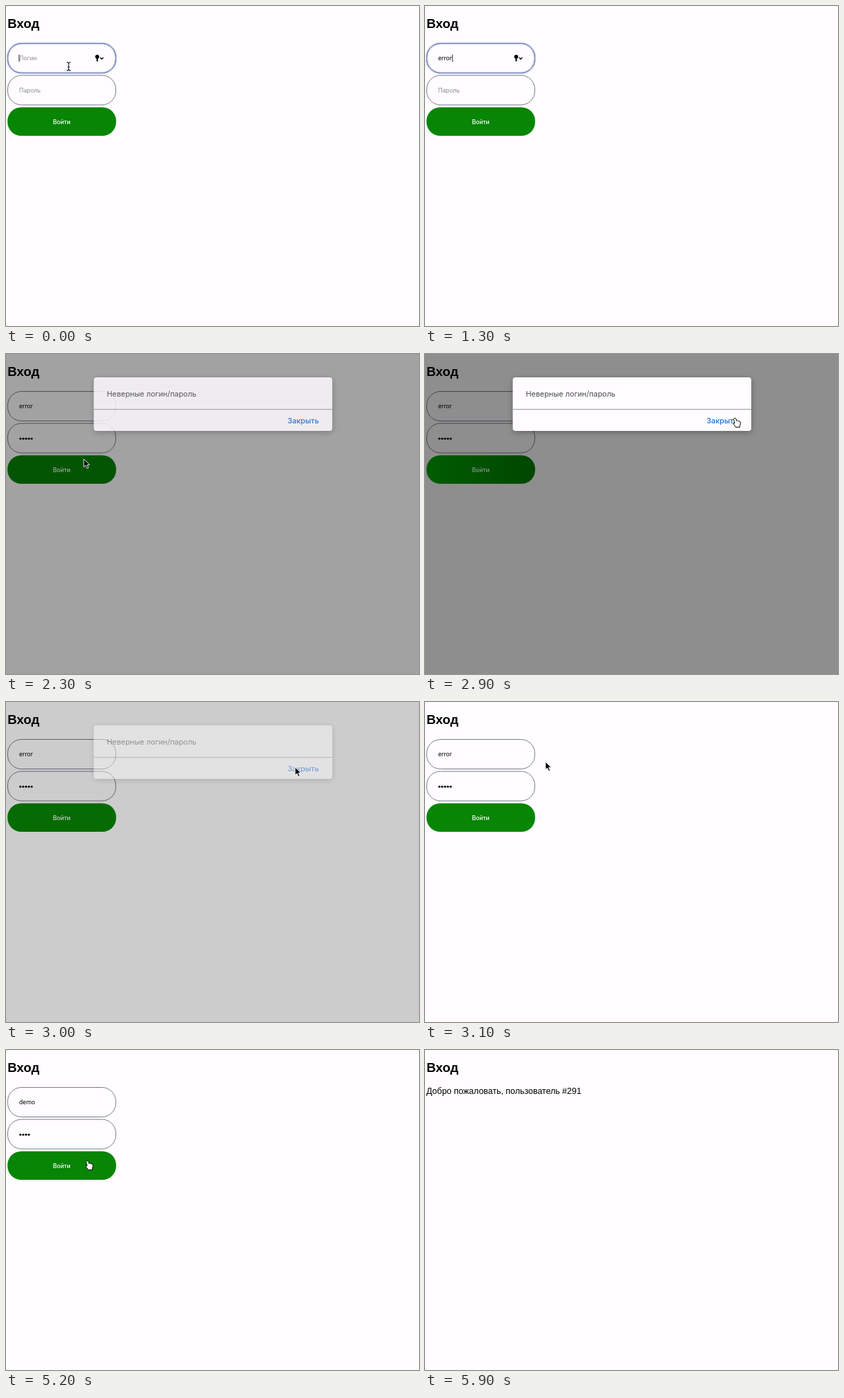
These frames come from a looping animation (600x466 px, 6.5 s). An HTML page:

```html
<!DOCTYPE html>
<html lang="ru">
<head>
<meta charset="utf-8">
<style>
  html, body { margin: 0; width: 100%; height: 100%; overflow: hidden; background: #fffdff; }
  svg { display: block; width: 600px; height: 466px; }
  text { font-family: Inter, sans-serif; font-size: 8.7px; }
  .page { font-family: "Liberation Sans", Arial, sans-serif; font-size: 12.46px; }
  .hint { fill: #8d8b90; }
  .box { fill: #fffdff; stroke: #6c6a78; stroke-width: .9; }
  .ring { fill: none; stroke: #a9bbec; stroke-opacity: .45; stroke-width: 4; }
  .dialog text { font-size: 10.9px; }
</style>
</head>
<body>
<svg viewBox="0 0 600 466">
  <defs>
    <g id="key">
      <circle cx="132.5" cy="73.8" r="2.9"/>
      <path d="M131.5 75h2v5l-1 1.3-1-1.3z"/>
      <path d="M136.8 75l2.3 2.2 2.3-2.2" fill="none" stroke="#000" stroke-width="1.4"/>
    </g>
    <g id="focus">
      <rect class="ring" x="2.5" y="54.5" width="157" height="43" rx="20"/>
      <rect x="2.5" y="54.5" width="157" height="43" rx="20" fill="none" stroke="#6b74a6"/>
      <use href="#key"/>
    </g>
    <linearGradient id="shade">
      <stop stop-color="#00a500"/><stop offset="1" stop-color="#007d00"/>
    </linearGradient>
    <filter id="soft" x="-10%" y="-30%" width="120%" height="160%">
      <feGaussianBlur stdDeviation="4"/>
    </filter>
  </defs>

  <rect width="600" height="466" fill="#fffdff"/>
  <text class="page" x="2.3" y="32.3" style="font-size:18.7px;font-weight:700">Вход</text>
  <text class="page" id="welcome" x="2" y="63.8">Добро пожаловать, пользователь #291</text>

  <g id="form">
    <rect class="box" x="2.5" y="54.5" width="157" height="43" rx="20"/>
    <rect class="box" x="2.5" y="101" width="157" height="43" rx="20"/>
    <use id="focusRing" href="#focus"/>
    <rect id="selection" y="70" x="19" height="12" fill="#b4d5fe"/>
    <text id="loginHint" class="hint" x="19" y="79.4">Логин</text>
    <text id="passHint" class="hint" x="19" y="126">Пароль</text>
    <text id="login" x="19" y="79.4"></text>
    <g id="dots"></g>
    <rect id="caret" width=".9" height="10.5"/>
    <rect id="button" x="2.2" y="147.5" width="157.8" height="41.5" rx="20"/>
    <text x="81" y="171.6" text-anchor="middle" fill="#fff" style="font-weight:500">Войти</text>
  </g>

  <rect id="overlay" width="600" height="466"/>
  <g id="dialog" class="dialog">
    <rect x="128" y="36" width="346" height="78" rx="4" opacity=".3" filter="url(#soft)"/>
    <rect x="127.5" y="34" width="346.5" height="78" rx="4" fill="#fffdff"/>
    <rect x="127.5" y="80.2" width="346.5" height=".9" fill="#8c8a90"/>
    <text x="146.5" y="62.2" fill="#4a484c">Неверные логин/пароль</text>
    <text x="409" y="101" fill="#1a6fe0" style="font-weight:500">Закрыть</text>
  </g>

  <g id="pointer">
    <path id="beam" d="M-3-6q3 0 3 2q0-2 3-2M-3 6q3 0 3-2q0 2 3 2M0-4V4M-1.5 1h3" fill="none" stroke="#111" stroke-width="1.1"/>
    <path id="arrow" d="M0 0V11.5L2.7 9 4.7 13.6 6.8 12.7 4.8 8.3H8.4Z" fill="#000" stroke="#fff" stroke-width=".9"/>
    <path id="hand" d="M-2.2-6.5q1.5-.8 2 1l.7 2.7q1.2-.8 2 .3q1.3-.6 1.9.5q1.7-.3 1.8 1.2q.5 3-.9 5.2v2.2h-6q-1.2-2.6-4-5.4q.2-1.8 2.6-.1l-1.4-5.5q-.2-1.4 1.3-2.1z" fill="#fff" stroke="#000"/>
  </g>
</svg>

<script>
const LOOP = 6500;
const $ = id => document.getElementById(id);

// time, login, password length, focused field (0 none, 1 login, 2 password), caret, selected
const typing = [
  [0, '', 0, 1, 1], [300, 'e', 0, 1, 1], [400, 'er', 0, 1, 1], [500, 'err', 0, 1, 1],
  [700, 'err', 0, 1, 0], [900, 'err', 0, 1, 1], [1000, 'erro', 0, 1, 1],
  [1300, 'error', 0, 1, 1], [1500, 'error', 0, 1, 0],
  [1700, 'error', 0, 2, 1], [1800, 'error', 2, 2, 1], [1900, 'error', 4, 2, 1],
  [2000, 'error', 5, 2, 1], [2200, 'error', 5, 0, 0],
  [3400, 'error', 5, 1, 1], [3600, 'error', 5, 1, 0, 1],
  [3800, 'd', 5, 1, 1], [3900, 'de', 5, 1, 1], [4000, 'demo', 5, 1, 1],
  [4100, 'demo', 5, 2, 0, 1], [4200, 'demo', 1, 2, 1], [4300, 'demo', 3, 2, 1],
  [4400, 'demo', 4, 2, 1], [4600, 'demo', 4, 2, 0], [5100, 'demo', 4, 0, 0]
];

// time, x, y, pointer shape
const moves = [
  [0, 91, 88, 'beam'], [300, 91, 88, ''],
  [2000, 106, 172, 'hand'], [2200, 113, 153, 'arrow'], [2300, 113, 153, 'arrow'],
  [2600, 340, 112, 'arrow'], [2800, 452, 100, 'hand'], [2900, 452, 100, 'hand'],
  [3000, 420, 95, 'arrow'], [3100, 175, 87, 'arrow'],
  [3300, 80, 78, 'beam'], [3600, 40, 77, 'beam'], [3700, 40, 77, ''],
  [4900, 110, 165, 'hand'], [5200, 120, 168, 'hand'],
  [5300, 150, 168, 'arrow'], [5500, 250, 168, 'arrow'], [5900, 250, 168, '']
];

const fade = [[2100, 0], [2200, .4], [2300, .82], [2400, 1], [2900, 1], [3000, .45], [3100, 0]];

const at = (list, t) => list.findLastIndex(k => k[0] <= t);

function mix(list, t, col) {
  const i = at(list, t);
  if (i < 0) return list[0][col];
  const a = list[i], b = list[i + 1] || a;
  return b === a ? a[col] : a[col] + (b[col] - a[col]) * (t - a[0]) / (b[0] - a[0]);
}

const show = (el, on) => el.style.display = on ? '' : 'none';

function set(el, attrs) {
  for (const k in attrs) el.setAttribute(k, attrs[k]);
}

for (let i = 0; i < 5; i++) {
  const dot = document.createElementNS('http://www.w3.org/2000/svg', 'circle');
  set(dot, { cx: 20.9 + i * 4.1, cy: 123.3, r: 1.55 });
  $('dots').append(dot);
}

function drawForm(t) {
  const [, login, count, focus, caret, selected] = typing[at(typing, t)];
  const onPass = focus === 2, dy = onPass ? 46.5 : 0;
  $('login').textContent = login;
  show($('loginHint'), !login);
  show($('passHint'), !count);
  [...$('dots').children].forEach((dot, i) => show(dot, i < count));

  const width = onPass ? count * 4.1 - .3 : login ? $('login').getComputedTextLength() : -.8;
  show($('focusRing'), focus);
  set($('focusRing'), { y: dy });
  show($('caret'), caret);
  set($('caret'), { x: 19.4 + width, y: 70.8 + dy });
  show($('selection'), selected);
  set($('selection'), { y: 70 + dy, width: Math.max(0, width) });
  set($('button'), { fill: t >= 2400 && t < 3000 ? 'url(#shade)' : '#078504' });
}

function draw(now) {
  const t = Math.floor(now % LOOP / 100) * 100;
  const done = t >= 5300;
  show($('form'), !done);
  show($('welcome'), done);
  drawForm(t);

  const p = mix(fade, t, 1);
  set($('overlay'), { opacity: .44 * p });
  set($('dialog'), { opacity: p });

  const shape = moves[at(moves, t)][3];
  for (const id of ['beam', 'arrow', 'hand']) show($(id), id === shape);
  set($('pointer'), { transform: `translate(${mix(moves, t, 1)} ${mix(moves, t, 2)})` });
}

const start = performance.now();
function tick() {
  draw(performance.now() - start);
  requestAnimationFrame(tick);
}
tick();
</script>
</body>
</html>
```
